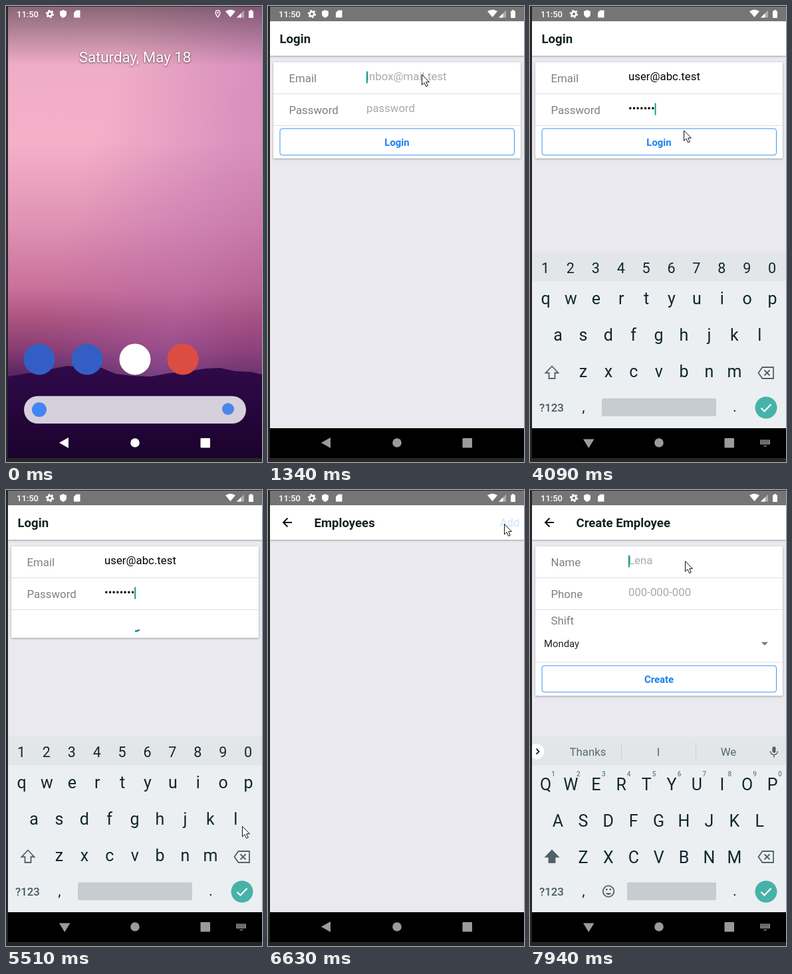
Animation, 385 px wide and 688 px high, one loop 8000 ms. Source, as an HTML page:

```html
<!DOCTYPE html>
<html lang="en">
<head>
<meta charset="utf-8">
<title>Login flow</title>
<style>
  html, body { margin: 0; width: 100%; height: 100%; overflow: hidden; background: #262626; }
  svg { display: block; }
  text { font-family: Roboto, sans-serif; font-size: 16.8px; white-space: pre; }
  .mid { text-anchor: middle; }
  .title { font-size: 18.6px; font-weight: 700; fill: #14221f; }
  .label { fill: #808080; }
  .hint { fill: #a9a9a9; }
  .button rect { fill: #fff; stroke: #3b92f5; }
  .button text { font-size: 14.9px; font-weight: 700; fill: #1a7ff0; text-anchor: middle; }
  .rule { stroke: #dedee2; }
  .caret { fill: #009688; }
  .card { fill: #fff; filter: drop-shadow(0 1px 1.5px #0005); }
  .line { fill: none; stroke: #50616a; stroke-width: 1.8; }
  .key { font-size: 25px; fill: #10272f; text-anchor: middle; }
</style>
</head>
<body>
<svg width="385" height="688" viewBox="0 0 385 688">
  <defs>
    <linearGradient id="sky" x1="0" y1="0" x2="0" y2="1">
      <stop offset="0" stop-color="#dfa5c0"/>
      <stop offset=".14" stop-color="#efacc6"/>
      <stop offset=".36" stop-color="#f5b0c8"/>
      <stop offset=".58" stop-color="#df92b4"/>
      <stop offset=".75" stop-color="#c87099"/>
      <stop offset=".83" stop-color="#aa5380"/>
      <stop offset=".91" stop-color="#873c73"/>
      <stop offset="1" stop-color="#45205a"/>
    </linearGradient>
    <linearGradient id="dusk" x1="0" y1=".3" x2="1" y2=".75">
      <stop offset=".3" stop-color="#b468b0" stop-opacity="0"/>
      <stop offset=".75" stop-color="#b468b0" stop-opacity=".4"/>
      <stop offset="1" stop-color="#9b4a8c" stop-opacity=".35"/>
    </linearGradient>
    <linearGradient id="scrim" x1="0" y1="0" x2="0" y2="1">
      <stop offset="0" stop-opacity=".38"/>
      <stop offset="1" stop-opacity="0"/>
    </linearGradient>
    <linearGradient id="hill" x1="0" y1="0" x2="0" y2="1">
      <stop offset="0" stop-color="#300a4b"/>
      <stop offset="1" stop-color="#1b022c"/>
    </linearGradient>
    <clipPath id="screen"><path d="M3 1H385V682H3z"/></clipPath>
  </defs>

  <g clip-path="url(#screen)">
    <g id="home">
      <path fill="url(#sky)" d="M3 1H385V570H3z"/>
      <path fill="url(#dusk)" d="M3 1H385V570H3z"/>
      <path fill="url(#scrim)" d="M3 1H385V90H3z"/>
      <path fill="url(#hill)" d="M3 559L40 553 72 547 92 543 112 545 130 540 146 547 165 555 190 558 218 559 245 554 275 551 300 547 322 546 345 551 368 552 385 556V682H3z"/>
      <text class="mid" x="194" y="85" fill="#fff" style="font-size:22.3px;text-shadow:0 1px 3px #0009">Saturday, May 18</text>
      <circle cx="50" cy="533" r="23.5" fill="#335fc4"/>
      <circle cx="122" cy="533" r="23.5" fill="#335fc4"/>
      <circle cx="194" cy="533" r="23.5" fill="#fff"/>
      <circle cx="266" cy="533" r="23.5" fill="#dc4d41"/>
      <rect x="27" y="588.5" width="334" height="41.5" rx="20.7" fill="#d6d0dc"/>
      <circle cx="50" cy="609" r="11" fill="#4285f4"/>
      <circle cx="334" cy="608" r="9" fill="#4a86e8"/>
    </g>

    <g id="app">
      <path fill="#fafafa" d="M3 23H385V637H3z"/>
      <g id="pages">
        <path fill="#e9e9ef" d="M3 75H385V637H3z"/>
        <g id="login">
          <rect id="loginCard" class="card" x="8" y="85" width="372" height="145"/>
          <path class="rule" d="M8 132.5H380M8 180.5H380"/>
          <text class="label" x="31.5" y="115">Email</text>
          <text class="label" x="31.5" y="163">Password</text>
          <text id="email" x="148" y="112"></text>
          <text id="password" x="148" y="160"></text>
          <g id="loginButton" class="button">
            <rect x="18" y="185" width="352.5" height="40" rx="3.5"/>
            <text x="194" y="211">Login</text>
          </g>
          <circle id="spinner" cx="194" cy="200.5" r="12.5" pathLength="360" fill="none" stroke="#009688" stroke-width="2.6"/>
        </g>
        <path id="employees" fill="#e9e9ef" d="M3 75H385V637H3z"/>
        <g id="create">
          <path fill="#e9e9ef" d="M3 75H385V637H3z"/>
          <rect class="card" x="8" y="85" width="372" height="225.5"/>
          <path class="rule" d="M8 132.5H380M8 180.5H380M8 260H380"/>
          <text class="label" x="31.5" y="115">Name</text>
          <text class="label" x="31.5" y="163">Phone</text>
          <text class="label" x="31.5" y="203">Shift</text>
          <text class="hint" x="148" y="112">Lena</text>
          <text class="hint" x="148" y="160">000-000-000</text>
          <text x="21" y="237" fill="#222" style="font-size:14.9px">Monday</text>
          <path fill="#777" d="M348 229.5h10l-5 5z"/>
          <g class="button">
            <rect x="18" y="265" width="352.5" height="40" rx="3.5"/>
            <text x="194" y="291">Create</text>
          </g>
        </g>
        <rect id="caret" class="caret" width="1.8" height="18"/>
        <path class="card" d="M3 23H385V75H3z"/>
        <text id="loginTitle" class="title" x="17.5" y="56">Login</text>
        <path id="back" d="M36 49H23M29.500 42.500L23 49L29.500 55.500" fill="none" stroke="#111" stroke-width="2"/>
        <text id="employeesTitle" class="title" x="69.500" y="56">Employees</text>
        <text id="createTitle" class="title" x="69.500" y="56">Create Employee</text>
        <text id="add" x="348.500" y="55" fill="#007aff">Add</text>
      </g>
      <path fill="#757575" d="M3 1H385V23H3z"/>
    </g>

    <g id="keyboard">
      <path fill="#eceff1" d="M3 372H385V637H3z"/>
      <path fill="#e2e6e9" d="M3 372H385V415H3z"/>
      <g id="strip">
        <circle cx="10" cy="394.500" r="11.500" fill="#fff"/>
        <path class="line" style="stroke:#222" d="M9.500 390.500l4 4-4 4"/>
        <rect x="364.500" y="387" width="5" height="9.500" rx="2.500" fill="#50616a"/>
        <path class="line" style="stroke-width:1.400" d="M361.500 394a5.500 5.500 0 0 0 11 0M367 399.500v4"/>
        <g id="suggestions" fill="#566870">
          <path stroke="#c9cfd3" d="M137.500 383V406M249.500 383V406"/>
          <text class="mid" x="87" y="401"></text>
          <text class="mid" x="193" y="401"></text>
          <text class="mid" x="298.500" y="401"></text>
        </g>
      </g>
      <g id="numbers"></g>
      <g id="digits"></g>
      <g id="letters"></g>
      <path id="shift" class="line" d="M33 543.500L42.500 553.500H37.500V562H28.500V553.500H23.500z"/>
      <path class="line" d="M349.500 545H366V562H349.500L343.500 553.500zM352.500 549.500l8 8m0-8l-8 8"/>
      <text class="mid" x="32.500" y="612" fill="#455a64" style="font-weight:500">?123</text>
      <text class="mid" x="80.500" y="612" style="font-size:22px" fill="#10272f">,</text>
      <text class="mid" x="308" y="612" style="font-size:22px" fill="#10272f">.</text>
      <g id="smiley">
        <circle class="line" cx="118" cy="605.500" r="8.300"/>
        <path fill="#50616a" d="M113.500 608h9q-4.500 6-9 0zM114 601.500h2.500v2.500H114zM119.500 601.500h2.500v2.500h-2.500z"/>
      </g>
      <rect id="space" y="592" height="27" rx="2" fill="#c7ccd0"/>
      <circle cx="355" cy="606" r="16.500" fill="#47b2a8"/>
      <path d="M347.500 606.500l5 5 10-10.500" fill="none" stroke="#fff" stroke-width="2.200"/>
    </g>

    <path id="navBar" d="M3 637H385V682H3z"/>
    <g id="nav">
      <path id="navBack" d="M80 659L94 651V667z"/>
      <circle cx="194" cy="659" r="6.800"/>
      <rect x="292.500" y="652" width="14.500" height="14.500" rx="1"/>
      <path id="navKeys" fill="#858585" d="M346 654.500h15v7h-15zM351.500 663h4.500v1.500h-4.500z"/>
      <path id="navKeyDots" stroke="#000" stroke-dasharray="1.200 1.300" d="M347.500 656.500h12M347.500 659h12"/>
    </g>

    <g fill="#fff">
      <text x="16" y="17" style="font-size:13px;font-weight:500">11:50</text>
      <circle cx="66" cy="12" r="3.400" fill="none" stroke="#fff" stroke-width="2.600"/>
      <circle cx="66" cy="12" r="5.200" fill="none" stroke="#fff" stroke-width="2" pathLength="12" stroke-dasharray="1"/>
      <path d="M86 6l5 2v3.500q0 4.500-5 6.500q-5-2-5-6.500V8z"/>
      <path d="M105.500 6.500H111.500V17.500H102V10z"/>
      <path id="pin" fill-rule="evenodd" d="M318.500 6a4 4 0 0 1 4 4q0 3-4 8q-4-5-4-8a4 4 0 0 1 4-4zm0 1.300a2.700 2.700 0 0 0-2.700 2.700q0 2 2.700 5.700q2.700-3.700 2.700-5.700a2.700 2.700 0 0 0-2.700-2.700zm0 1.500a1.300 1.300 0 1 1 0 2.600a1.300 1.300 0 1 1 0-2.600z"/>
      <path d="M330 8q7.500-5 15 0L337.500 17z"/>
      <path opacity=".4" d="M347 17.500L358 6.500V17.500z"/>
      <path d="M347 17.500L353.500 11V17.500z"/>
      <path d="M365 7.500h2V6h3v1.500h2V18h-7z"/>
    </g>
    <path id="pointer" fill="#fff" stroke="#111" d="M.5.500V16L4 12.700 6.600 18.500 9.300 17.300 6.700 11.700H11.500z"/>
  </g>
</svg>

<script>
const LOOP = 8000;
const EMAIL = "user@abc.test";
const PASSWORD_TIMES = [3150, 3330, 3430, 3610, 3810, 3950, 4080, 4180];
const POINTER = [
  [960, 386, 90], [1240, 231, 103], [2700, 231, 103], [2900, 231, 150], [3810, 231, 150],
  [4200, 231, 202], [4650, 231, 202], [5410, 330, 358], [5510, 355, 507], [5610, 355, 507],
  [6350, 355, 51], [6740, 355, 51], [7090, 288, 96], [7280, 233, 107]
];

const el = {};
document.querySelectorAll("svg [id]").forEach(node => el[node.id] = node);

const set = (node, attrs) => { for (const k in attrs) node.setAttribute(k, attrs[k]); };
const show = (node, on) => node.style.display = on ? "" : "none";
const between = (t, a, b) => t >= a && t < b;
const ramp = (t, a, b) => Math.min(1, Math.max(0, (t - a) / (b - a)));
const ease = x => 1 - (1 - x) ** 3;
const mix = (a, b, k) => a + (b - a) * k;

function addText(parent, value, x, y, attrs) {
  const node = document.createElementNS("http://www.w3.org/2000/svg", "text");
  node.textContent = value;
  set(node, { x, y, ...attrs });
  parent.append(node);
}

const COLUMN = 37.9;
["qwertyuiop", "asdfghjkl", "zxcvbnm"].forEach((row, r) =>
  [...row].forEach((c, i) =>
    addText(el.letters, c, [23.500, 42, 80][r] + i * COLUMN, 450 + r * 55, { class: "key" })));
[..."1234567890"].forEach((c, i) => {
  addText(el.digits, c, 35 + i * COLUMN, 432, { class: "mid", fill: "#6d7c84", style: "font-size:10px;font-weight:500" });
  addText(el.numbers, c, 23 + i * COLUMN, 403, { class: "key", style: "font-size:21.500px" });
});

function pointerAt(t) {
  const next = POINTER.findIndex(p => p[0] > t);
  if (next < 0) return POINTER.at(-1).slice(1);
  const [t0, x0, y0] = POINTER[next - 1], [t1, x1, y1] = POINTER[next];
  const k = ramp(t, t0, t1);
  return [mix(x0, x1, k), mix(y0, y1, k)];
}

function drawField(node, value, hint) {
  node.textContent = value || hint;
  node.setAttribute("class", value ? "" : "hint");
  return 148 + (value ? node.getComputedTextLength() : 0);
}

function drawPages(t) {
  const open = ease(ramp(t, 180, 490));
  show(el.app, t >= 200);
  set(el.app, { opacity: open, transform: `translate(0 ${60 * (1 - open)})` });
  show(el.pages, t >= 670);

  const typed = t < 1800 ? 0 : Math.floor((t - 1800) / 72.7) + 1;
  const emailEnd = drawField(el.email, EMAIL.slice(0, typed), "inbox@mail.test");
  const dots = PASSWORD_TIMES.filter(time => t >= time).length;
  const passwordEnd = drawField(el.password, "•".repeat(dots), "password");

  const loading = t >= 4500;
  show(el.loginButton, !loading);
  show(el.spinner, loading);
  set(el.loginCard, { height: loading ? 138 : 145 });
  const cycle = ((t - 5510) / 1333 + 1) % 1;
  const smooth = x => x * x * (3 - 2 * x);
  const head = smooth(ramp(cycle, 0, .5)), tail = smooth(ramp(cycle, .5, 1));
  set(el.spinner, {
    "stroke-dasharray": `${33 + 241 * (head - tail)} 360`,
    transform: `rotate(${57 + 241 * tail + 119 * cycle} 194 200.500)`
  });

  const toList = ease(ramp(t, 5620, 6000)), toForm = ease(ramp(t, 6740, 7090));
  set(el.employees, { transform: `translate(${382 * (1 - toList)} 0)` });
  set(el.create, { transform: `translate(${382 * (1 - toForm)} 0)` });
  set(el.loginTitle, { opacity: 1 - toList });
  set(el.back, { opacity: toList });
  set(el.employeesTitle, { opacity: toList * (1 - toForm) });
  set(el.createTitle, { opacity: toForm });
  set(el.add, { opacity: toList * (1 - toForm) * (between(t, 6540, 6740) ? .2 : 1) });

  const focus = t >= 7480 ? [148, 98.500, 7480]
    : between(t, 3000, 5620) ? [passwordEnd, 146.500, 4180]
    : between(t, 1240, 3000) ? [emailEnd, 98.500, 2672] : null;
  const blinkOn = focus && (t < focus[2] || (t - focus[2]) % 1000 < 500);
  show(el.caret, blinkOn);
  if (focus) set(el.caret, { x: focus[0], y: focus[1] });
}

function drawKeyboard(t) {
  const up = ease(ramp(t, 1420, 1690)) - ramp(t, 5610, 5850) + ease(ramp(t, 7560, 7850));
  const secret = between(t, 3050, 7000), caps = t >= 7000;
  show(el.keyboard, up > 0);
  set(el.keyboard, { transform: `translate(0 ${265 * (1 - up)})` });
  show(el.strip, !secret);
  show(el.digits, !secret);
  show(el.smiley, !secret);
  show(el.numbers, secret);
  set(el.space, { x: secret ? 108 : 146, width: secret ? 172 : 134 });
  for (const key of el.letters.children)
    key.textContent = caps ? key.textContent.toUpperCase() : key.textContent.toLowerCase();
  set(el.letters, { transform: `translate(0 ${caps ? 2.500 : 0})` });
  el.shift.style.fill = caps ? "#50616a" : "none";

  show(el.suggestions, caps || between(t, 1890, 2160));
  const words = caps ? ["Thanks", "I", "We"] : ["use", "user", "users"];
  el.suggestions.querySelectorAll("text").forEach((node, i) => node.textContent = words[i]);

  const open = up > 0;
  set(el.navBack, { d: open ? "M80 653.500H96.500L88.200 667z" : "M80 659L94 651V667z" });
  show(el.navKeys, open);
  show(el.navKeyDots, open);
}

function frame() {
  const t = performance.now() % LOOP;
  drawPages(t);
  drawKeyboard(t);
  set(el.navBar, { opacity: ramp(t, 190, 400) });
  set(el.nav, { fill: t < 200 ? "#fff" : "#9b9b9b" });
  show(el.pin, t < 300);
  show(el.pointer, t >= 960);
  if (t >= 960) set(el.pointer, { transform: `translate(${pointerAt(t)})` });
  requestAnimationFrame(frame);
}
frame();
</script>
</body>
</html>
```
